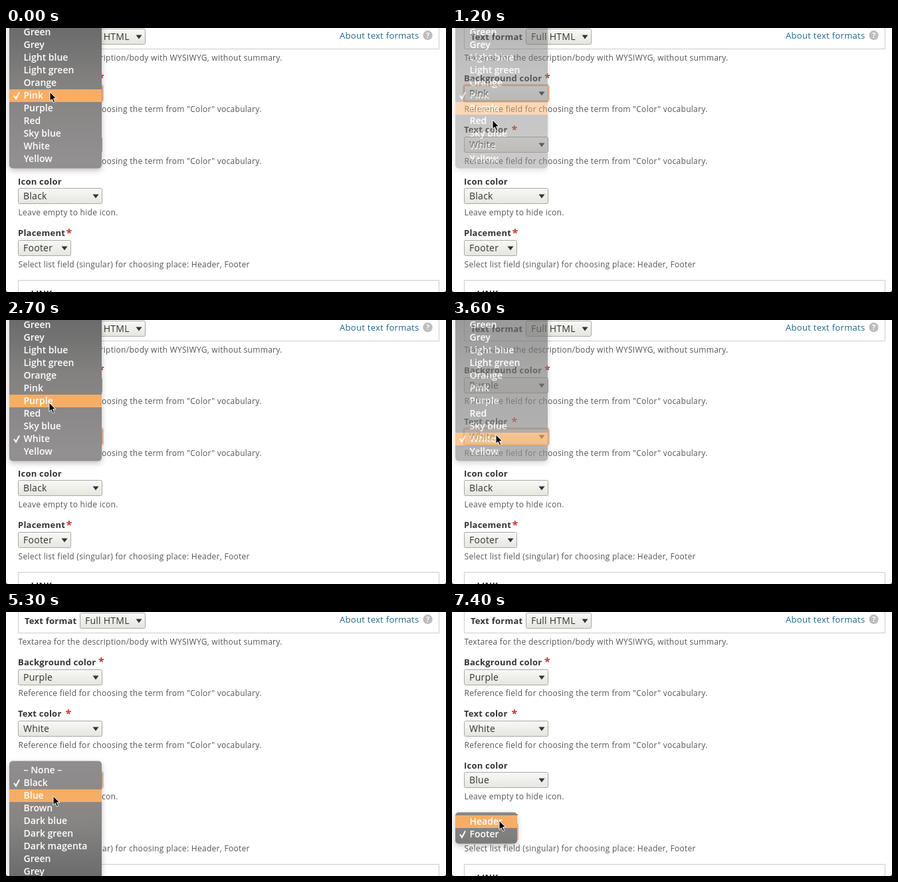
Write an HTML page that moves like this. It is 662 by 396 pixels and loops after 7500 ms.

```html
<!DOCTYPE html>
<html lang="en">
<head>
<meta charset="utf-8">
<title>Color settings form</title>
<style>
  html, body { margin: 0; width: 100%; height: 100%; overflow: hidden; background: #fff; }
  svg { display: block; }
  text { font-family: "Open Sans", "Noto Sans", sans-serif; white-space: pre; }
  .label { font-size: 13px; font-weight: 700; letter-spacing: .23px; fill: #333; }
  .hint { font-size: 12px; letter-spacing: .29px; fill: #555; }
  .value { font-size: 14px; letter-spacing: .25px; fill: #333; }
  .link { font-size: 13px; letter-spacing: .3px; fill: #1b678f; }
  .star { font-size: 16px; font-weight: 700; fill: #c8352b; }
  .item { font-size: 14px; font-weight: 600; fill: #fff; }
  .help { font-size: 11px; font-weight: 700; fill: #fff; text-anchor: middle; }
  .frame { fill: none; stroke: #ccc; }
  .panel { filter: drop-shadow(0 3px 4px rgba(0, 0, 0, .25)); }
</style>
</head>
<body>
<svg id="stage" width="662" height="396" viewBox="0 0 662 396">
  <defs>
    <linearGradient id="button" x2="0" y2="1">
      <stop stop-color="#f8f8f6"/><stop offset="1" stop-color="#e6e6df"/>
    </linearGradient>
    <!-- menus darken towards the screen edges -->
    <linearGradient id="shade" gradientUnits="userSpaceOnUse" x1="0" y1="0" x2="0" y2="396">
      <stop stop-color="#6b6b6b"/><stop offset=".2" stop-color="#828180"/>
      <stop offset=".5" stop-color="#929090"/><stop offset=".8" stop-color="#868584"/>
      <stop offset="1" stop-color="#6b6b6b"/>
    </linearGradient>
  </defs>

  <path class="frame" d="M18.5 0V31.5H651.5V0M18.5 396V378.5H651.5V396"/>
  <text class="label" x="28" y="17.5">Text format</text>
  <text class="link" x="502" y="15.5">About text formats</text>
  <circle cx="634.5" cy="11" r="7.2" fill="#bdbdbd"/>
  <text class="help" x="634.5" y="15">?</text>
  <text class="hint" x="18.5" y="48.5">Textarea for the description/body with WYSIWYG, without summary.</text>

  <text class="label" x="18" y="79.5">Background color</text>
  <text class="star" x="139" y="80">*</text>
  <text class="hint" x="18.5" y="126">Reference field for choosing the term from "Color" vocabulary.</text>

  <text class="label" x="18" y="157">Text color</text>
  <text class="star" x="89.5" y="158">*</text>
  <text class="hint" x="18.5" y="203.5">Reference field for choosing the term from "Color" vocabulary.</text>

  <text class="label" x="18" y="234.5">Icon color</text>
  <text class="hint" x="18.5" y="281">Leave empty to hide icon.</text>

  <text class="label" x="18" y="312">Placement</text>
  <text class="star" x="90.5" y="312.5">*</text>
  <text class="hint" x="18.5" y="358.5">Select list field (singular) for choosing place: Header, Footer</text>
  <text class="label" x="37.5" y="402.5">LINK</text>

  <g id="selects"></g>
  <g id="menus"></g>
  <path d="M0 392Q0 396 4 396H0ZM662 392Q662 396 658 396H662Z" fill="#666"/>

  <g id="cursor" stroke-linejoin="round">
    <path id="arrow" d="M0 0V13.5L3.2 10.7L5.4 15.8L7.7 14.8L5.5 9.8H9.8Z" fill="#000" stroke="#fff"/>
    <path id="hand" d="M-1.4 1.2Q0-.6 1.4 1.2L2 6Q3.6 4.6 4.8 6.2Q6.3 5.2 7.3 6.9Q9.2 6.3 9.6 8.3V11.5L8 14.5V17H.6V15.2L-3.6 10.4Q-4.4 8.2-2.4 8.4L-.4 10Z" fill="#fff" stroke="#111" stroke-width="1.1"/>
  </g>
</svg>

<script>
const LOOP = 7500, STEP = 100, ROW = 19;
const COLORS = ['– None –', 'Black', 'Blue', 'Brown', 'Dark blue', 'Dark green', 'Dark magenta',
  'Green', 'Grey', 'Light blue', 'Light green', 'Orange', 'Pink', 'Purple', 'Red', 'Sky blue',
  'White', 'Yellow'];

const $ = id => document.getElementById(id);

function add(parent, tag, attrs, text) {
  const el = document.createElementNS('http://www.w3.org/2000/svg', tag);
  for (const key in attrs) el.setAttribute(key, attrs[key]);
  if (text) el.textContent = text;
  return parent.appendChild(el);
}

function makeSelect(x, y, w, value) {
  const g = add($('selects'), 'g', { transform: `translate(${x} ${y})` });
  const box = { width: w, height: 23, rx: 2 };
  const glow = add(g, 'rect', { ...box, fill: 'none', stroke: '#f0b892', 'stroke-width': 5, opacity: .75 });
  const face = add(g, 'rect', { ...box, fill: 'url(#button)', stroke: '#a8a8a8' });
  const label = add(g, 'text', { class: 'value', x: 7.5, y: 16.5 }, value);
  add(g, 'path', { d: `M${w - 14} 9h9l-4.5 6z`, fill: '#333' });
  return {
    label,
    focus(on) {
      glow.style.display = on ? '' : 'none';
      face.setAttribute('stroke', on ? '#d99f78' : '#a8a8a8');
    },
    contains: (px, py) => px > x && px < x + w && py > y && py < y + 23
  };
}

// top: upper edge of the first row; open, pick and shut are times in ms
function makeMenu(items, top, w, checked, open, pick, shut) {
  const g = add($('menus'), 'g', {});
  add(g, 'rect', { class: 'panel', x: 5, y: top - 4.5, width: w, height: items.length * ROW + 9, rx: 5, fill: 'url(#shade)' });
  const bar = add(g, 'rect', { x: 5, width: w, height: ROW, fill: '#f6ae66' });
  items.forEach((name, i) =>
    add(g, 'text', { class: 'item', x: 26.5, y: top + i * ROW + 14 }, name));
  add(g, 'path', {
    d: `M12 ${top + checked * ROW + 9.5}l3 4.5l5-9.5`,
    fill: 'none', stroke: '#fff', 'stroke-width': 2
  });
  return t => {
    const fade = Math.min(1, Math.max(0, (shut - t) / (shut - pick)));
    const alpha = t < open ? 0 : fade;
    const row = Math.floor((cursorAt(Math.min(t, pick))[1] - top) / ROW);
    bar.setAttribute('y', top + row * ROW);
    g.style.opacity = alpha;
    g.style.display = alpha ? '' : 'none';
    return alpha > 0;
  };
}

// time, x, y
const PATH = [
  [0, 66, 96], [400, 66, 98], [900, 63, 118], [1000, 62, 121], [1200, 61, 138],
  [1700, 63, 172], [2000, 63, 172], [2600, 65, 124], [2700, 65, 124], [3000, 66, 172],
  [3900, 66, 172], [4200, 68, 252], [4500, 69, 254], [4900, 71, 275], [5300, 71, 276],
  [5700, 71, 314], [5800, 71, 314], [6200, 72, 325], [6700, 72, 325], [7000, 71, 313]
];

function cursorAt(t) {
  const i = PATH.findIndex(p => p[0] > t);
  if (i < 0) return PATH[PATH.length - 1].slice(1);
  const a = PATH[i - 1], b = PATH[i], k = (t - a[0]) / (b[0] - a[0]);
  return [1, 2].map(n => Math.round(a[n] + (b[n] - a[n]) * k));
}

makeSelect(111.5, 1.5, 98, 'Full HTML').focus(false);
const back = makeSelect(18.5, 86.5, 126, 'Pink');
const ink = makeSelect(18.5, 163.5, 126, 'White');
const icon = makeSelect(18.5, 240.5, 126, 'Black');
const place = makeSelect(18.5, 318.5, 79, 'Footer');
const selects = [back, ink, icon, place];
const opens = [0, 1900, 4200, 6600];

const menus = [
  makeMenu(COLORS, -136, 139, 12, opens[0], 1020, 1360),
  makeMenu(COLORS, -135, 139, 16, opens[1], 3490, 3830),
  makeMenu(COLORS, 228, 139, 1, opens[2], 5320, 5500),
  makeMenu(['Header', 'Footer'], 305, 93, 1, opens[3], LOOP, LOOP + STEP)
];

function draw(now) {
  const t = Math.floor(now % LOOP / STEP) * STEP;
  const [x, y] = cursorAt(t);
  const active = opens.filter(o => o <= t).length - 1;
  selects.forEach((s, i) => s.focus(i === active));
  back.label.textContent = t < 1300 ? 'Pink' : 'Purple';
  icon.label.textContent = t < 5400 ? 'Black' : 'Blue';

  const busy = menus.map(show => show(t)).includes(true);
  const hand = !busy && selects.some(s => s.contains(x, y));
  $('cursor').setAttribute('transform', `translate(${x} ${y})`);
  $('hand').style.display = hand ? '' : 'none';
  $('arrow').style.display = hand ? 'none' : '';
}

const start = performance.now();
function tick() {
  draw(performance.now() - start);
  requestAnimationFrame(tick);
}
tick();
</script>
</body>
</html>
```
